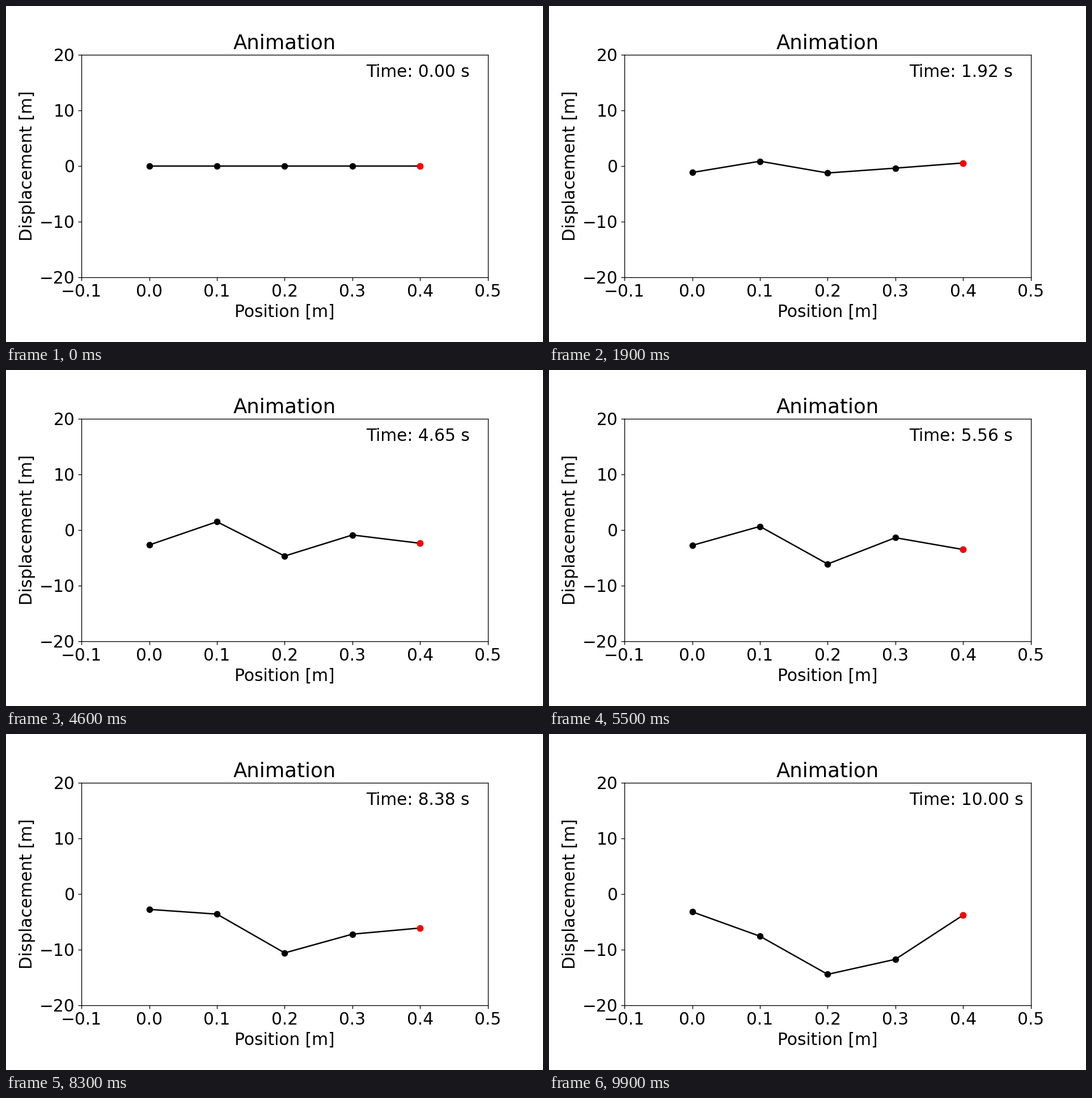
Write a matplotlib script that moves like this. It is 947x592 px and loops after 10 s.

```python
import numpy as np
import matplotlib.pyplot as plt
from matplotlib.animation import FuncAnimation

W, H = 947, 592
DPI = W / 8
FRAMES = 100
T_END = 10.0

plt.rcParams.update({"font.family": "DejaVu Sans", "font.size": 18})

times = np.linspace(0, T_END, FRAMES)
KEYS = [19, 37, 55, 67, 83, 99]  # time steps of the key poses
NODES = [
    (KEYS, [-1.18, -2.48, -2.78, -2.65, -2.78, -3.22]),
    (KEYS, [0.84, 1.73, 0.63, -1.00, -3.63, -7.60]),
    ([19, 33, 37, 44, 55, 67, 83, 99],
     [-1.27, -2.57, -3.09, -4.33, -6.13, -7.91, -10.60, -14.45]),
    (KEYS, [-0.40, -0.80, -1.40, -3.47, -7.23, -11.75]),
    (KEYS, [0.53, -1.02, -3.52, -5.30, -6.13, -3.82]),
]


def spline(x, y, at):
    """Natural cubic spline through (x, y), evaluated at the given points."""
    n, h = len(x), np.diff(x)
    slope = np.diff(y) / h
    a, b = np.eye(n), np.zeros(n)
    for i in range(1, n - 1):
        a[i, i - 1:i + 2] = h[i - 1], 2 * (h[i - 1] + h[i]), h[i]
        b[i] = 6 * (slope[i] - slope[i - 1])
    m = np.linalg.solve(a, b)
    i = np.clip(np.searchsorted(x, at) - 1, 0, n - 2)
    u, v = at - x[i], x[i + 1] - at
    return ((m[i] * v**3 + m[i + 1] * u**3) / (6 * h[i])
            + (y[i] / h[i] - m[i] * h[i] / 6) * v
            + (y[i + 1] / h[i] - m[i + 1] * h[i] / 6) * u)


def path(steps, values):
    """Motion from rest: t^2 times a smooth even function of t."""
    t = times[steps]
    g = np.array(values) / t**2
    return times**2 * spline(np.r_[-t[::-1], t], np.r_[g[::-1], g], times)


pos = np.arange(5) / 10
disp = np.array([path(*node) for node in NODES])

fig = plt.figure(figsize=((W + 1e-4) / DPI, (H + 1e-4) / DPI), dpi=DPI)
left, right, top, bottom = 133.2, 849.6, 85.6, 477.9
ax = fig.add_axes([left / W, 1 - bottom / H, (right - left) / W, (bottom - top) / H])
ax.set(xlim=(-0.1, 0.5), ylim=(-20, 20), title="Animation",
       xlabel="Position [m]", ylabel="Displacement [m]",
       xticks=[i / 10 for i in range(-1, 6)], yticks=range(-20, 21, 10))

chain, = ax.plot([], [], "ko-")
tip, = ax.plot([], [], "ro")
clock = ax.text(0.32, 16, "")


def update(i):
    chain.set_data(pos, disp[:, i])
    tip.set_data(pos[-1:], disp[-1:, i])
    clock.set_text(f"Time: {times[i]:.2f} s")
    return chain, tip, clock


anim = FuncAnimation(fig, update, frames=FRAMES, interval=100, repeat=True)
plt.show()
```
